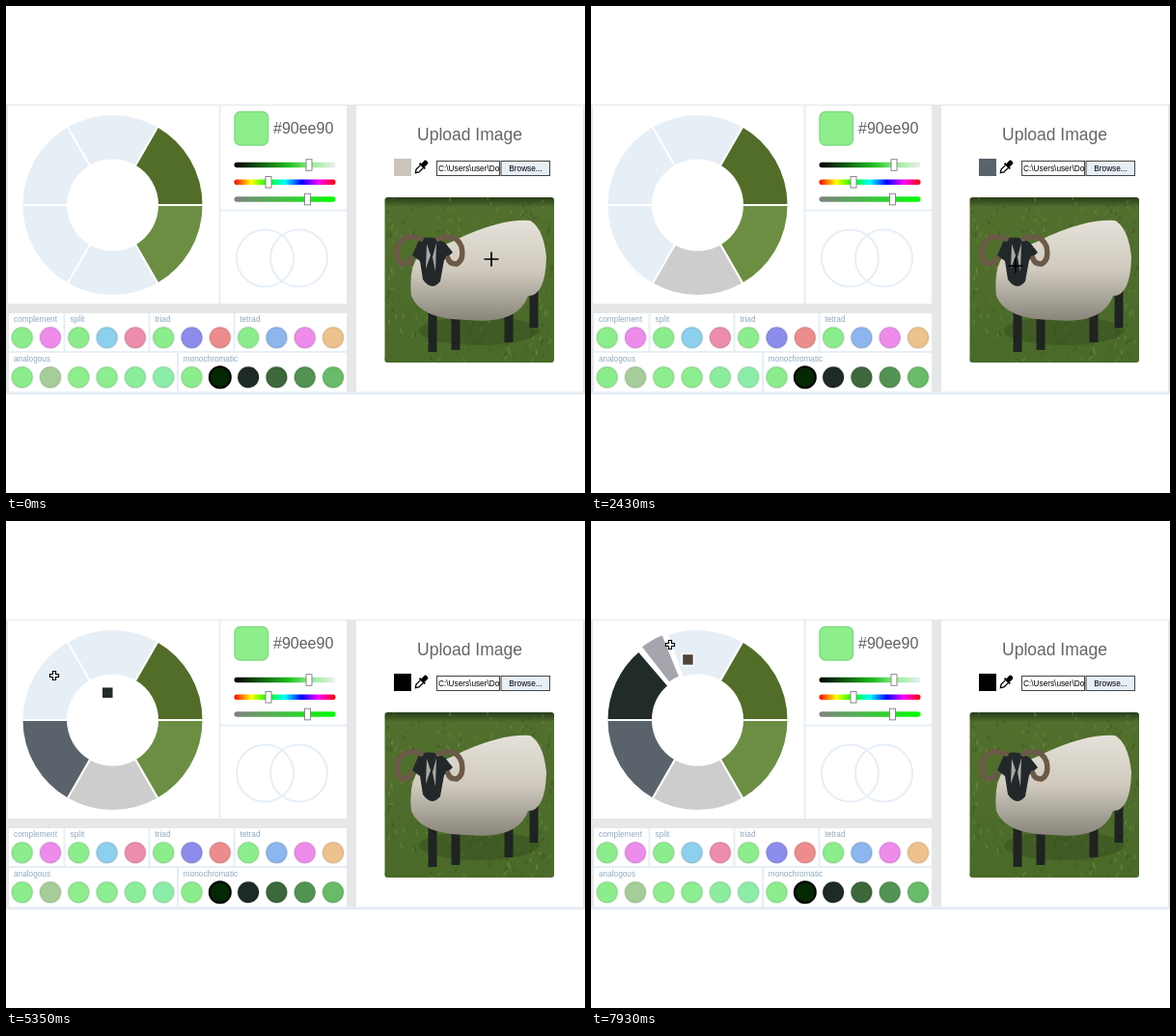
An HTML page for the animation above (8 s loop, 600 by 504 pixels).

```html
<!DOCTYPE html>
<html lang="en">
<head>
<meta charset="utf-8">
<title>Colour wheel picker</title>
<style>
html, body { margin: 0; width: 100%; height: 100%; overflow: hidden; background: #fff; }
svg { display: block; width: 600px; height: 504px; }
text { font-family: "Liberation Sans", Arial, sans-serif; }
.line { fill: none; stroke: #e6eef6; stroke-width: 2px; }
.small { font-size: 8.25px; }
</style>
</head>
<body>
<svg viewBox="0 0 600 504" xmlns="http://www.w3.org/2000/svg">
  <defs>
    <linearGradient id="light"><stop/><stop offset=".55" stop-color="#22c322"/><stop offset=".75" stop-color="#90ee90"/><stop offset="1" stop-color="#eee"/></linearGradient>
    <linearGradient id="hue"></linearGradient>
    <linearGradient id="sat"><stop stop-color="gray"/><stop offset="1" stop-color="lime"/></linearGradient>
    <linearGradient id="grass" x2="0" y2="1"><stop stop-color="#283d1b"/><stop offset=".06" stop-color="#526f2d"/><stop offset="1" stop-color="#4a6a29"/></linearGradient>
    <linearGradient id="wool" x2="0" y2="1"><stop stop-color="#e6e2d9"/><stop offset=".5" stop-color="#cfc9be"/><stop offset="1" stop-color="#89857a"/></linearGradient>
    <clipPath id="photo"><rect x="392.5" y="198" width="175.5" height="171" rx="3"/></clipPath>
    <clipPath id="file"><rect x="447" y="161" width="64" height="15"/></clipPath>
  </defs>

  <rect y="102" width="600" height="300" fill="#e6e7e8"/>
  <rect x="2" y="103" width="351" height="205" fill="#fff"/>
  <rect x="363" y="103" width="235" height="296" fill="#fff"/>
  <rect x="3" y="318" width="350" height="81" fill="#fff"/>
  <path class="line" d="M221.5 103v205M222 211.5h131M3 358h350M60.5 318v40m88 0v-40m88 0v40M178 358v41M0 400h600"/>

  <g id="wheel" stroke="#fff" stroke-width="2"></g>

  <rect x="237" y="109.5" width="34.5" height="34.5" rx="6" fill="#8eee8c" stroke="#82dc82" stroke-width="1.5"/>
  <text x="277" y="132" font-size="16" fill="#606060">#90ee90</text>
  <g id="sliders"></g>
  <circle class="line" cx="268.5" cy="261" r="29.5"/>
  <circle class="line" cx="303.5" cy="261" r="29.5"/>
  <g id="palette"></g>

  <text x="480.5" y="139" font-size="17.5" fill="#666" text-anchor="middle">Upload Image</text>
  <rect id="swatch" x="402" y="158" width="18" height="18"/>
  <g transform="translate(430 167) rotate(45)">
    <rect x="-2.5" y="-9" width="5" height="7" rx="2"/>
    <path d="M-4 -2H4" stroke="#000" stroke-width="2"/>
    <path d="M-2 -1V5L0 8L2 5V-1" fill="#fff" stroke="#000" stroke-width="1.3"/>
  </g>
  <rect x="446.5" y="160.5" width="65" height="15" fill="#fff" stroke="#444"/>
  <text class="small" x="448" y="171" clip-path="url(#file)">C:\Users\user\Do</text>
  <rect x="513" y="160.5" width="50.5" height="15" fill="#e6eef6" stroke="#444"/>
  <text class="small" x="538.5" y="171" text-anchor="middle">Browse...</text>

  <g clip-path="url(#photo)">
    <rect x="392" y="198" width="177" height="172" fill="url(#grass)"/>
    <g id="blades"></g>
    <ellipse cx="490" cy="336" rx="62" ry="15" fill="#2d4519" opacity=".4"/>
    <path d="M442 315V358M466 318V356M521 312V348M547 290V333" stroke="#1f2322" stroke-width="9"/>
    <path d="M462 244Q510 220 543 222Q557 230 560 260Q559 300 541 300Q530 330 480 325Q430 325 420 300Q417 270 428 258Z" fill="url(#wool)"/>
    <path d="M421 258L428 242Q440 236 455 245L463 255L454 263L450 285Q441 296 432 283L429 264Z" fill="#22282a"/>
    <path d="M436 246L435 272L440 258ZM446 245L445 275L442 260Z" fill="#aaa9a5"/>
    <path id="horn" d="M430 241Q412 234 406 249Q403 263 411 267Q419 267 420 261" fill="none" stroke="#6b5a47" stroke-width="5.5" stroke-linecap="round"/>
    <use href="#horn" transform="translate(878 0) scale(-1 1)"/>
  </g>

  <rect id="chip" width="12" height="12" stroke="#fff" stroke-width="1.5"/>
  <g id="cursor" fill="#fff" stroke="#000">
    <path id="cross" d="M-7.5 0h15M0 -7.5v15" stroke-width="1.7"/>
    <path id="cell" d="M-1.5 -4.5h3v3h3v3h-3v3h-3v-3h-3v-3h3Z" stroke-width="1.2"/>
    <path id="hand" d="M-2 -5Q-1 -7 0 -5V1L5 3L4 10H-2L-5 4L-2 4Z"/>
    <path id="arrow" d="M0 0V13L3 10L6 15L5 10H9Z"/>
  </g>
</svg>
<script>
const $ = id => document.getElementById(id);
const LOOP = 8000, CX = 110.5, CY = 206, EMPTY = '#e6eef6';
const clamp = v => Math.max(0, Math.min(1, v));

function add(parent, tag, attrs) {
  const el = document.createElementNS('http://www.w3.org/2000/svg', tag);
  for (const k in attrs) el.setAttribute(k, attrs[k]);
  return $(parent).appendChild(el);
}

// Static details
for (let i = 0; i <= 12; i++) add('hue', 'stop', { offset: i / 12, 'stop-color': `hsl(${i * 30},100%,50%)` });
function slider(id, y, knob) {
  add('sliders', 'rect', { x: 236.5, y: y - 2.8, width: 105, height: 5.6, rx: 2.8, fill: `url(#${id})` });
  add('sliders', 'rect', { x: knob - 3, y: y - 5.8, width: 6, height: 11.6, fill: '#fff', stroke: '#888' });
}
slider('light', 164.5, 314);
slider('hue', 182.3, 272);
slider('sat', 200, 312.5);

const tint = h => `hsl(${h},73%,74%)`;
function group(name, y, start, fills) {
  add('palette', 'text', { x: 8 + start * 29.3, y: y - 16, class: 'small', fill: '#8fa9c0' }).textContent = name;
  fills.forEach((fill, i) => {
    const dot = { cx: 16.7 + (start + i) * 29.3, cy: y, r: 11, 'stroke-width': 2 };
    add('palette', 'circle', { ...dot, fill, stroke: '#000', 'stroke-opacity': fill === '#032803' ? 1 : .07 });
  });
}
group('complement', 343.3, 0, [120, 301].map(tint));
group('split', 343.3, 2, [120, 198, 341].map(tint));
group('triad', 343.3, 5, [120, 240, 0].map(tint));
group('tetrad', 343.3, 8, [120, 214, 301, 33].map(tint));
group('analogous', 384.2, 0, [tint(120), '#a6cd99', ...[119, 123, 130, 138].map(tint)]);
group('monochromatic', 384.2, 6, [tint(120), '#032803', '#1e2a24', '#3c683c', '#529252', '#68bb68']);

let seed = 7;
const rand = () => (seed = seed * 16807 % 2147483647) / 2147483647;
const tones = ['#3d5a20', '#6c8a3c', '#789348', '#34501c'];
for (let i = 0; i < 260; i++) {
  const x = 392 + rand() * 176, y = 200 + rand() * 170;
  add('blades', 'path', {
    d: `M${x} ${y}l${rand() * 8 - 4} ${-2 - rand() * 4}`,
    stroke: tones[i % 4], opacity: .5, 'stroke-width': 1 + rand()
  });
}

// Cursor moves: eased curves from the last resting place
const moves = [];
let rest = [503, 262];
function move(start, end, via, to) {
  moves.push({ start, end, from: rest, via, to });
  rest = to;
}
const drags = [], gaps = [], picks = [];
const drag = (from, to, fill, slot) => drags.push({ from, to, fill, slot });
const gap = (from, to, at, fill) => gaps.push({ from, to, at, fill });
const pick = (from, fill) => picks.push({ from, fill });

pick(0, '#cbc5bc');
move(130, 350, [496, 254], [504, 260]);
pick(310, '#cdcdcd');
drag(610, 1300, '#cdcdcd', 1);
move(610, 1110, [320, 175], [182, 207]);
gap(1040, 1180, 0, '#5f7e36');
move(1110, 1320, [130, 230], [112, 275]);
move(1650, 1960, [300, 435], [489, 291]);
pick(1900, '#8b897f');

move(2160, 2430, [465, 275], [440, 269]);
pick(2360, '#5a636c');
drag(3060, 3710, '#5a636c', 2);
move(3060, 3740, [200, 190], [55, 248]);
move(3900, 4180, [250, 470], [451, 238]);
pick(4100, '#3a3d37');

move(4360, 4380, [451, 235], [451, 233]);
pick(4380, '#506b24');
move(4380, 4650, [449, 242], [445, 246]);
pick(4560, '#212b29');
drag(5050, 5440, '#212b29', 3);
move(5050, 5350, [250, 170], [50, 160]);
move(5350, 5470, [49, 164], [48, 165]);
move(5770, 6070, [260, 550], [485, 240]);
pick(6000, '#dcd8cf');

move(6230, 6500, [475, 236], [461, 241]);
pick(6460, '#41402f');
move(6500, 6750, [466, 236], [460, 241]);
move(7210, 7270, [459, 240], [458, 239]);
pick(7240, '#4e4438');
drag(7570, LOOP, '#4e4438');
move(7570, 7890, [250, 150], [82, 128]);
gap(7840, 8100, 4, '#a5a5ad');

function cursorAt(t) {
  const m = moves.filter(q => q.start <= t).pop() || moves[0];
  const k = clamp((t - m.start) / (m.end - m.start)), u = k * k * (3 - 2 * k), v = 1 - u;
  return m.to.map((end, c) => v * v * m.from[c] + 2 * u * v * m.via[c] + u * u * end);
}

const parts = Array.from({ length: 7 }, () => add('wheel', 'path', {}));

function sector(a0, a1, push = 0) {
  const rad = a => a * Math.PI / 180, mid = rad((a0 + a1) / 2);
  const x = CX + push * Math.cos(mid), y = CY + push * Math.sin(mid);
  const pt = (r, a) => `${x + r * Math.cos(rad(a))} ${y + r * Math.sin(rad(a))}`;
  return `M${pt(94, a0)}A94 94 0 0 1 ${pt(94, a1)}L${pt(46.5, a1)}A46.5 46.5 0 0 0 ${pt(46.5, a0)}Z`;
}

function drawWheel(t) {
  const fills = ['#6b8e43', EMPTY, EMPTY, EMPTY, EMPTY, '#526d28'];
  for (const d of drags) if (d.slot && t >= d.to) fills[d.slot] = d.fill;
  const g = gaps.find(q => t >= q.from && t < q.to);
  const open = g ? Math.min(clamp((t - g.from) / 50), clamp((g.to - t) / 50)) : 0;
  fills.forEach((fill, i) => {
    const lead = g && g.at === i ? 10.5 * open : 0;
    const tail = g && (g.at + 5) % 6 === i ? 10.5 * open : 0;
    parts[i].setAttribute('d', sector(i * 60 + lead, i * 60 + 60 - tail));
    parts[i].setAttribute('fill', fill);
  });
  const w = 8 * open;
  parts[6].setAttribute('d', open ? sector(g.at * 60 - w, g.at * 60 + w, 2 * open) : '');
  parts[6].setAttribute('fill', g ? g.fill : 'none');
  return fills;
}

function cursorKind(x, y, inPhoto, held, fills) {
  if (inPhoto) return 'cross';
  const r = Math.hypot(x - CX, y - CY);
  const slot = Math.floor((Math.atan2(y - CY, x - CX) / Math.PI * 3 + 6) % 6);
  if (r > 46 && r < 95 && fills[slot] !== EMPTY) return 'hand';
  return held ? 'cell' : 'arrow';
}

function draw(t) {
  const fills = drawWheel(t);
  const [x, y] = cursorAt(t);
  const held = drags.find(d => t >= d.from && t < d.to);
  const inPhoto = x > 392 && x < 568 && y > 198 && y < 369;

  const kind = cursorKind(x, y, inPhoto, held, fills);
  $('cursor').setAttribute('transform', `translate(${x} ${y})`);
  for (const id of ['cross', 'cell', 'hand', 'arrow']) $(id).setAttribute('visibility', id === kind ? 'visible' : 'hidden');
  $('swatch').setAttribute('fill', inPhoto ? picks.filter(p => p.from <= t).pop().fill : '#000');

  const chip = $('chip');
  chip.setAttribute('visibility', held ? 'visible' : 'hidden');
  if (held) {
    // The chip trails the pointer slightly
    const [px, py] = cursorAt(Math.max(held.from, t - 60));
    chip.setAttribute('x', px + 9);
    chip.setAttribute('y', py + 9);
    chip.setAttribute('fill', held.fill);
  }
}

function tick() {
  draw(performance.now() % LOOP);
  requestAnimationFrame(tick);
}
tick();
</script>
</body>
</html>
```
